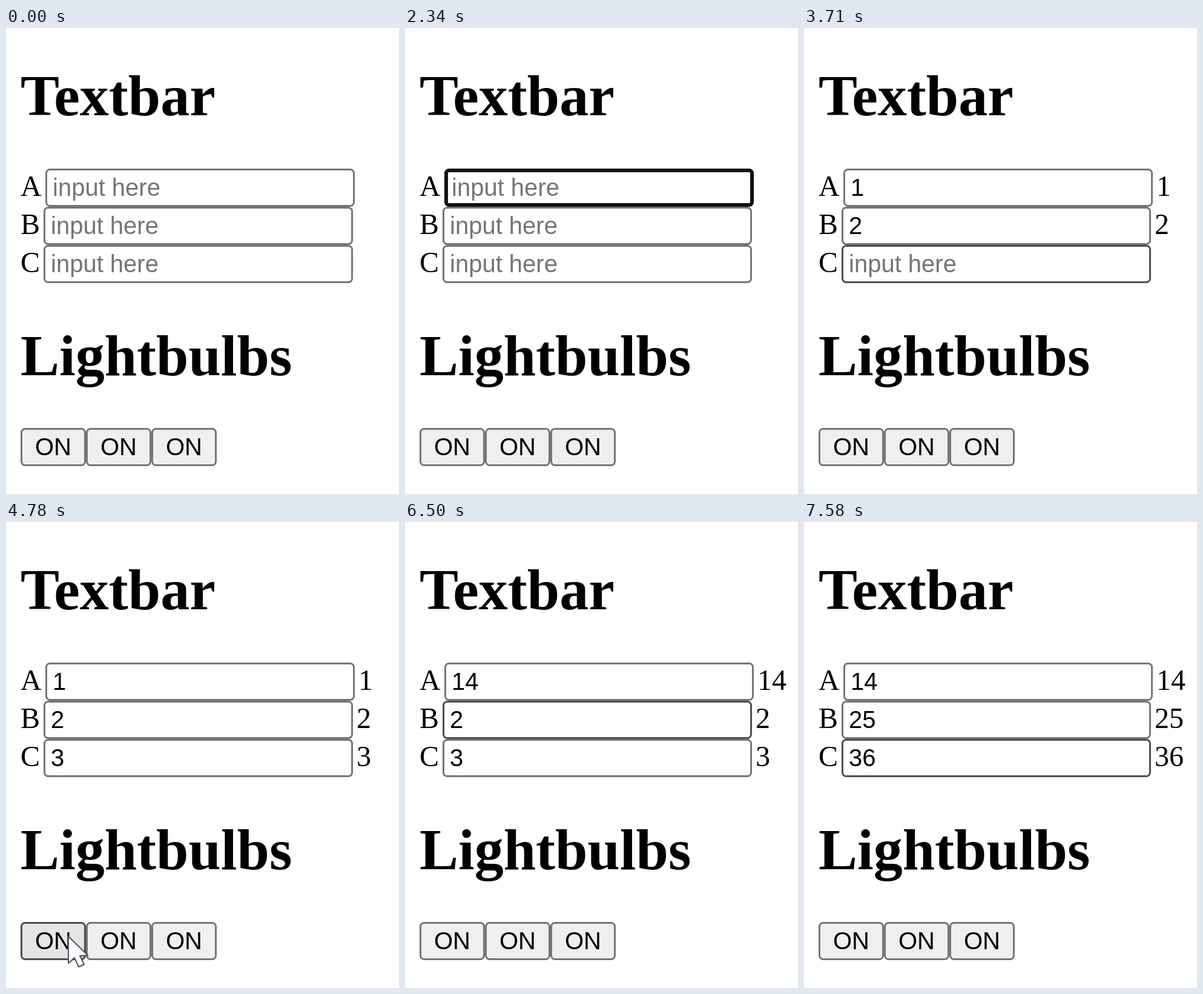
Animation, 649 px wide and 769 px high, one loop 8000 ms. Source, as an HTML page with a canvas:

```html
<!DOCTYPE html>
<html lang="en">
<head>
<meta charset="utf-8">
<title>Textbar and Lightbulbs</title>
<style>
  html, body { margin: 0; width: 100%; height: 100%; overflow: hidden; background: #fff; }
  canvas { display: block; }
</style>
</head>
<body>
<canvas id="stage" width="649" height="769"></canvas>
<script>
const ctx = document.getElementById("stage").getContext("2d");
const LOOP = 8000;
const SERIF = '"Liberation Serif", "Times New Roman", serif';
const SANS = '"Liberation Sans", Arial, sans-serif';

const fields = [
  { key: "A", x: 65, y: 232 },
  { key: "B", x: 62, y: 295 },
  { key: "C", x: 62, y: 358 },
];
const FIELD_W = 511, BOX_H = 63, BUTTON_W = 108;

const start = { A: "", B: "", C: "", hover: "", focus: "", caret: false, pointer: null };
const hover = key => ({ hover: key, pointer: null });
const click = key => ({ focus: key, caret: true });
// Each keystroke remounts the field, so it loses focus.
const type = (key, value) => ({ [key]: value, focus: "", caret: false });
const point = (x, y, over = "") => ({ hover: over, pointer: [x, y] });

const events = [
  [1300, point(535, 134)],
  [1420, point(545, 246, "A")],
  [1530, hover("A")],
  [1790, click("A")],
  [2340, { caret: false }],
  [2740, type("A", "1")],
  [3030, hover("B")],
  [3300, click("B")],
  [3500, type("B", "2")],
  [3710, hover("C")],
  [3980, click("C")],
  [4290, type("C", "3")],
  [4550, point(110, 606)],
  [4670, point(99, 701, "button0")],
  [4780, point(102, 683, "button0")],
  [4910, point(104, 673, "button0")],
  [5030, hover("")],
  [5140, hover("B")],
  [5450, hover("A")],
  [5540, click("A")],
  [6090, { caret: false }],
  [6270, type("A", "14")],
  [6500, hover("B")],
  [6760, click("B")],
  [6920, type("B", "25")],
  [7120, hover("C")],
  [7420, click("C")],
  [7580, type("C", "36")],
];

function stateAt(time) {
  const past = events.filter(([at]) => at <= time).map(([, change]) => change);
  return Object.assign({}, start, ...past);
}

function text(str, x, y, font, color = "#000") {
  ctx.font = font;
  ctx.fillStyle = color;
  ctx.fillText(str, x, y);
}

function box(x, y, w, h, fill, stroke, line) {
  ctx.beginPath();
  ctx.roundRect(x + line / 2, y + line / 2, w - line, h - line, 7.5 - line / 2);
  ctx.fillStyle = fill;
  ctx.fill();
  ctx.strokeStyle = stroke;
  ctx.lineWidth = line;
  ctx.stroke();
}

const borderColor = hovered => hovered ? "#4f4f4f" : "#767676";

function drawField({ key, x, y }, state) {
  const value = state[key];
  const focused = state.focus === key;
  const baseline = y + 45;
  const font = `40px ${SANS}`;
  const stroke = focused ? "#101010" : borderColor(state.hover === key);
  text(key, 24, baseline, `48px ${SERIF}`);
  box(x, y, FIELD_W, BOX_H, "#fff", stroke, focused ? 6 : 3);
  text(value || "input here", x + 12, baseline, font, value ? "#000" : "#757575");
  if (focused && state.caret) {
    ctx.fillStyle = "#000";
    ctx.fillRect(Math.floor(x + 12 + ctx.measureText(value).width), y + 9, 3, 44);
  }
  text(value, x + FIELD_W + 6, baseline, `48px ${SERIF}`);
}

function drawButton(i, state) {
  const hovered = state.hover === "button" + i;
  const x = 24 + i * BUTTON_W;
  box(x, 660, BUTTON_W, BOX_H, hovered ? "#e5e5e5" : "#efefef", borderColor(hovered), 3);
  text("ON", x + 24, 705, `40px ${SANS}`);
}

function drawPointer([x, y]) {
  ctx.save();
  ctx.translate(x, y);
  ctx.beginPath();
  [[1, 1], [1, 45], [11, 36], [18, 51], [27, 47], [20, 33], [33, 32]]
    .forEach(([px, py]) => ctx.lineTo(px, py));
  ctx.closePath();
  ctx.shadowColor = "rgba(0,0,0,0.3)";
  ctx.shadowBlur = 3;
  ctx.shadowOffsetX = ctx.shadowOffsetY = 1;
  ctx.fillStyle = "#fff";
  ctx.fill();
  ctx.shadowColor = "transparent";
  ctx.strokeStyle = "#56566c";
  ctx.lineWidth = 2;
  ctx.lineJoin = "round";
  ctx.stroke();
  ctx.restore();
}

function draw(time) {
  const state = stateAt(time);
  ctx.fillStyle = "#fff";
  ctx.fillRect(0, 0, 649, 769);
  text("Textbar", 24, 144, `bold 96px ${SERIF}`);
  text("Lightbulbs", 24, 573, `bold 96px ${SERIF}`);
  fields.forEach(field => drawField(field, state));
  [0, 1, 2].forEach(i => drawButton(i, state));
  if (state.pointer) drawPointer(state.pointer);
}

const began = performance.now();
function tick() {
  draw((performance.now() - began) % LOOP);
  requestAnimationFrame(tick);
}
tick();
</script>
</body>
</html>
```
